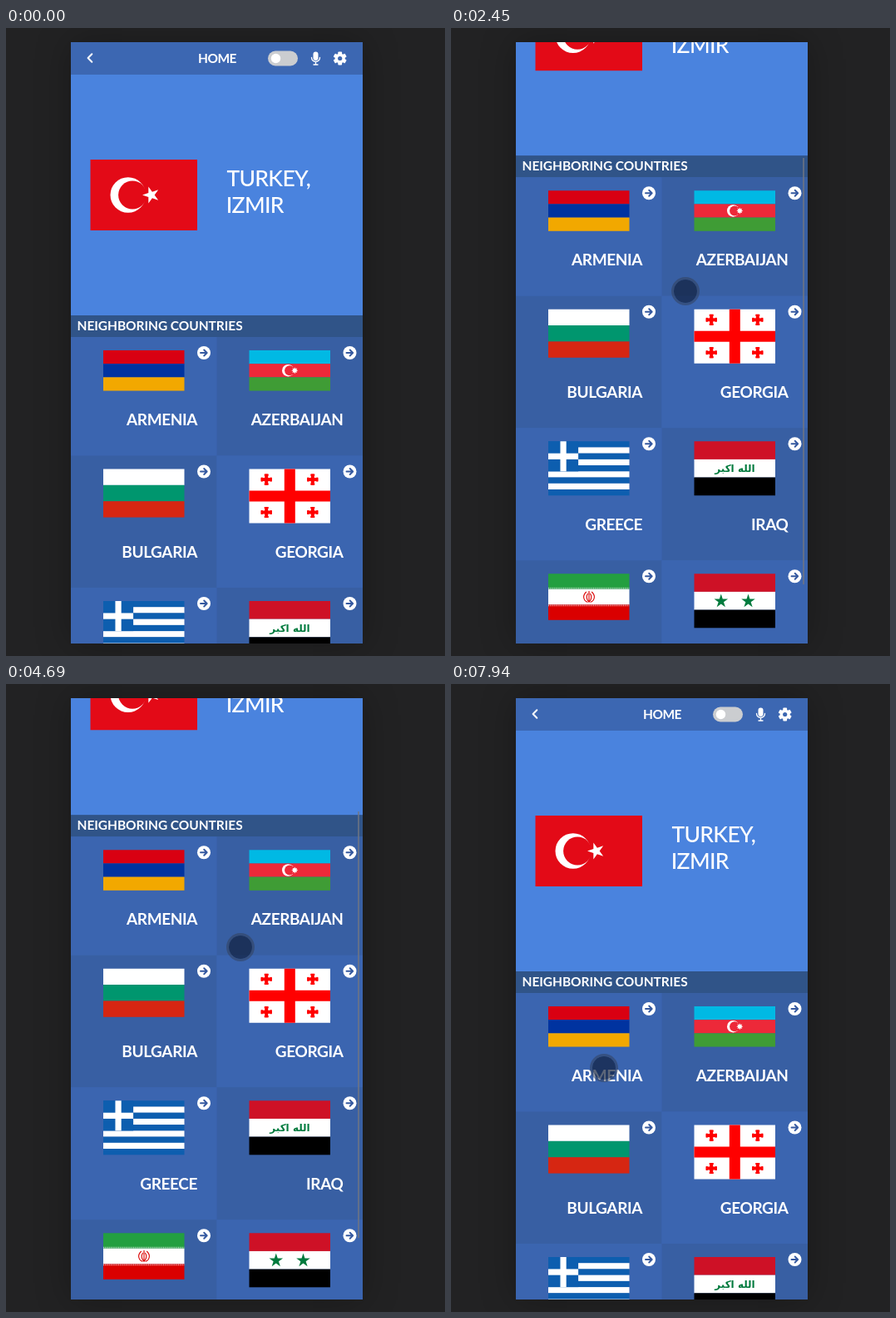
Recreate the animation shown at these times as an HTML page. Size 528 by 754 pixels, loop 8 s.

```html
<!DOCTYPE html>
<html lang="en">
<head>
<meta charset="utf-8">
<title>Neighboring countries</title>
<style>
  html, body { margin: 0; width: 100%; height: 100%; overflow: hidden; background: #222223; }
  #panel {
    position: absolute; left: 78px; top: 17px; width: 351px; height: 722px;
    overflow: hidden; background: #3b65b0; box-shadow: 0 0 40px rgba(0, 0, 0, .28);
  }
  #page { position: absolute; left: 0; top: 0; display: block; }
  #bar {
    position: absolute; left: 345px; top: 0; width: 2px; height: 512px;
    background: rgba(112, 118, 130, .75);
  }
  #cursor {
    position: absolute; left: -17px; top: -17px; width: 28px; height: 28px;
    border: 3px solid rgba(50, 62, 84, .5); border-radius: 50%;
    background: rgba(16, 30, 58, .68); background-clip: padding-box;
  }
  text { font-family: Lato, "Open Sans", sans-serif; fill: #fff; }
  .bold { font-weight: 700; }
  .place { font-size: 26.5px; font-weight: 500; letter-spacing: -.7px; }
  .name { font-size: 19px; letter-spacing: -.4px; text-anchor: end; }
  .title { font-size: 15.5px; letter-spacing: -.05px; }
  .script { font: bold 12px "DejaVu Sans", sans-serif; fill: #007a3d; text-anchor: middle; }
</style>
</head>
<body>
<div id="panel">
  <svg id="page" width="351" height="996" viewBox="78 17 351 996"></svg>
  <div id="bar"></div>
</div>
<div id="cursor"></div>
<script>
const $ = id => document.getElementById(id);
const rect = (x, y, w, h, fill) => `<rect x="${x}" y="${y}" width="${w}" height="${h}" fill="${fill}"/>`;
const disc = (x, y, r, fill) => `<circle cx="${x}" cy="${y}" r="${r}" fill="${fill}"/>`;
const line = (d, stroke, w) =>
  `<path d="${d}" fill="none" stroke="${stroke}" stroke-width="${w}" stroke-linecap="round" stroke-linejoin="round"/>`;
const label = (x, y, cls, s) => `<text x="${x}" y="${y}" class="${cls}">${s}</text>`;

function star(x, y, r, tips, inner, turn, fill) {
  const pts = Array.from({ length: tips * 2 }, (_, i) => {
    const a = turn + i * Math.PI / tips, q = i % 2 ? r * inner : r;
    return (x + q * Math.cos(a)).toFixed(2) + ',' + (y + q * Math.sin(a)).toFixed(2);
  });
  return `<polygon points="${pts.join(' ')}" fill="${fill}"/>`;
}

const W = 97.5;
const bands = (h, colors) =>
  colors.map((c, i) => rect(0, i * h / colors.length, W, h / colors.length + .05, c)).join('');
const plus = (x, y, s, t, c) => rect(x - t / 2, y - s / 2, t, s, c) + rect(x - s / 2, y - t / 2, s, t, c);

function iran() {
  const red = '#da0000';
  const fringe = (y, c) =>
    `<path d="M0 ${y}H${W}" stroke="${c}" stroke-width="2" stroke-dasharray="1 .8"/>`;
  const emblem = line('M49 21V34M45.5 22C41 26 42 32 47 34M52.5 22C57 26 56 32 51 34' +
    'M47.4 24C45 28 46 31 49 34M50.6 24C53 28 52 31 49 34', red, 1.1);
  return bands(55.5, ['#239f40', '#fff', red]) + fringe(17.5, '#a9d8b4') + fringe(38, '#f2a0a0') + emblem;
}

function greece() {
  const blue = '#0d5eaf', s = 65 / 9;
  return bands(65, Array.from({ length: 9 }, (_, i) => i % 2 ? '#fff' : blue)) +
    rect(0, 0, 5 * s, 5 * s, blue) + plus(2.5 * s, 2.5 * s, 5 * s, s, '#fff');
}

function georgia() {
  const red = '#f00';
  let s = rect(0, 0, W, 65, '#fff') + rect(42.3, 0, 13, 65, red) + rect(0, 26, W, 13, red);
  for (const x of [20.7, 76.3]) for (const y of [12.6, 52])
    s += plus(x, y, 13, 4, red) + plus(x, y, 12.6, 2, red) +
      rect(x - 6.5, y - 2.5, 2, 5, red) + rect(x + 4.5, y - 2.5, 2, 5, red) +
      rect(x - 2.5, y - 6.5, 5, 2, red) + rect(x - 2.5, y + 4.5, 5, 2, red);
  return s;
}

const azerbaijan = () => bands(48.5, ['#00b9e4', '#ed2939', '#3f9c35']) +
  disc(46.8, 24.2, 7.3, '#fff') + disc(48.6, 24.2, 6, '#ed2939') +
  star(54.8, 24.2, 4, 8, .55, 0, '#fff');

const arab = ['#ce1126', '#fff', '#000'];
const iraq = () => bands(65, arab) + label(49, 36.5, 'script', 'الله اكبر');
const syria = () => bands(65, arab) +
  [32.3, 65].map(x => star(x, 33, 8.7, 5, .382, -Math.PI / 2, '#007a3d')).join('');

const rows = [371, 513.5, 672, 831, 1013];
const cells = [
  ['ARMENIA', () => bands(48.5, ['#d90012', '#0033a0', '#f2a800'])],
  ['AZERBAIJAN', azerbaijan],
  ['BULGARIA', () => bands(58, ['#fff', '#00966e', '#d62612'])],
  ['GEORGIA', georgia],
  ['GREECE', greece],
  ['IRAQ', iraq],
  ['IRAN (ISLAMIC|REPUBLIC OF)', iran],
  ['SYRIAN ARAB|REPUBLIC', syria]
];

function cell([name, flag], i) {
  const row = i >> 1, col = i % 2, x = 78 + col * 175.5, y = rows[row];
  const ax = x + 160, ay = y + 19;
  return rect(x, y, 175.5, rows[row + 1] - y, (row + col) % 2 ? '#385fa3' : '#3b65b0') +
    `<g transform="translate(${x + 39} ${y + 16})">${flag()}</g>` +
    disc(ax, ay, 8, '#fff') +
    line(`M${ax - 4} ${ay}h7.5m-3.3 -3.5l3.5 3.5l-3.5 3.5`, '#3559a0', 1.9) +
    name.split('|').map((s, k) => label(x + 152, y + (row ? 122.5 : 106) + k * 23, 'name bold', s)).join('');
}

function gear(x, y) {
  let s = '';
  for (let a = 0; a < 360; a += 60)
    s += `<rect x="${x - 2.4}" y="${y - 8}" width="4.8" height="6" rx="1" fill="#fff" transform="rotate(${a} ${x} ${y})"/>`;
  return s + disc(x, y, 6, '#fff') + disc(x, y, 2.6, '#3c67b2');
}

const header = rect(78, 17, 351, 39, '#3c67b2') +
  line('M103.3 31.3L98.6 36L103.3 40.7', '#fff', 2) +
  `<text x="231" y="42" class="title bold" style="letter-spacing:-.5px">HOME</text>` +
  '<rect x="315" y="27.5" width="36" height="18" rx="9" fill="#cbcdd0"/>' + disc(324.5, 36.5, 5.7, '#fff') +
  '<rect x="369.5" y="28.5" width="6" height="10.5" rx="3" fill="#fff"/>' +
  line('M367.5 35.5a5 5 0 0 0 10 0M372.5 41v3M370 44h5', '#fff', 1.3) +
  gear(401.7, 36.5);

const hero = rect(78, 56, 351, 289, '#4a83de') + rect(101.5, 158, 128.5, 85, '#e30a17') +
  disc(146.8, 200.5, 21.3, '#fff') + disc(152.1, 200.5, 17, '#e30a17') +
  star(174.6, 200.5, 10.6, 5, .382, Math.PI, '#fff') +
  label(265.5, 189.5, 'place', 'TURKEY,') + label(264.8, 221.5, 'place', 'IZMIR');

$('page').innerHTML = header + hero + rect(78, 345, 351, 26, '#305488') +
  label(85.5, 363, 'title bold', 'NEIGHBORING COUNTRIES') + cells.map(cell).join('');

// start, end, steps, from, to, easing power
const scrolls = [
  [1710, 1910, 4, 0, 98, .6],
  [2240, 2520, 5, 98, 196, .6],
  [3060, 3200, 3, 196, 274, .6],
  [4620, 4760, 3, 274, 176, .6],
  [5230, 5510, 5, 176, 0, .91]
];
// start, end, steps, then start, control and end point
const moves = [
  [220, 350, 3, 600, 824, 485, 587, 370, 349],
  [550, 1030, 8, 370, 349, 315, 220, 282, 316],
  [5970, 6110, 3, 282, 316, 269, 330, 256, 343],
  [6180, 6530, 6, 256, 343, 200, 590, 175, 438],
  [6660, 6950, 5, 175, 438, 165, 428, 160, 418],
  [7810, 7940, 3, 160, 418, 172, 440, 184, 461]
];
// when the scrollbar shows, starts to fade, and is gone
const shows = [[1710, 2900, 2920], [3060, 3560, 3750], [4620, 5840, 5910]];

const LOOP = 8000;
const latest = (list, t) => list.filter(s => s[0] <= t).pop();
const stepped = ([a, b, n], t) =>
  Math.min(1, (Math.floor((t - a) / (b - a) * (n - 1) + .01) + 1) / n);
const bezier = (a, c, b, p) => (1 - p) * (1 - p) * a + 2 * p * (1 - p) * c + p * p * b;

function scrollAt(t) {
  const s = latest(scrolls, t);
  if (!s) return 0;
  const q = stepped(s, t) ** s[5];
  return s[3] + (s[4] - s[3]) * q * q * (3 - 2 * q);
}

function draw(t) {
  const y = scrollAt(t);
  $('page').style.transform = `translateY(${-y}px)`;

  const show = latest(shows, t);
  $('bar').style.opacity = show ? Math.max(0, Math.min(1, (show[2] - t) / (show[2] - show[1]))) : 0;
  $('bar').style.transform = `translateY(${y * 722 / 996}px)`;

  const m = latest(moves, t), c = $('cursor').style;
  c.visibility = m ? 'visible' : 'hidden';
  if (m) {
    const p = stepped(m, t);
    c.transform = `translate(${bezier(m[3], m[5], m[7], p)}px, ${bezier(m[4], m[6], m[8], p)}px)`;
  }
}

const begin = performance.now();
function tick() {
  draw((performance.now() - begin) % LOOP);
  requestAnimationFrame(tick);
}
tick();
</script>
</body>
</html>
```
